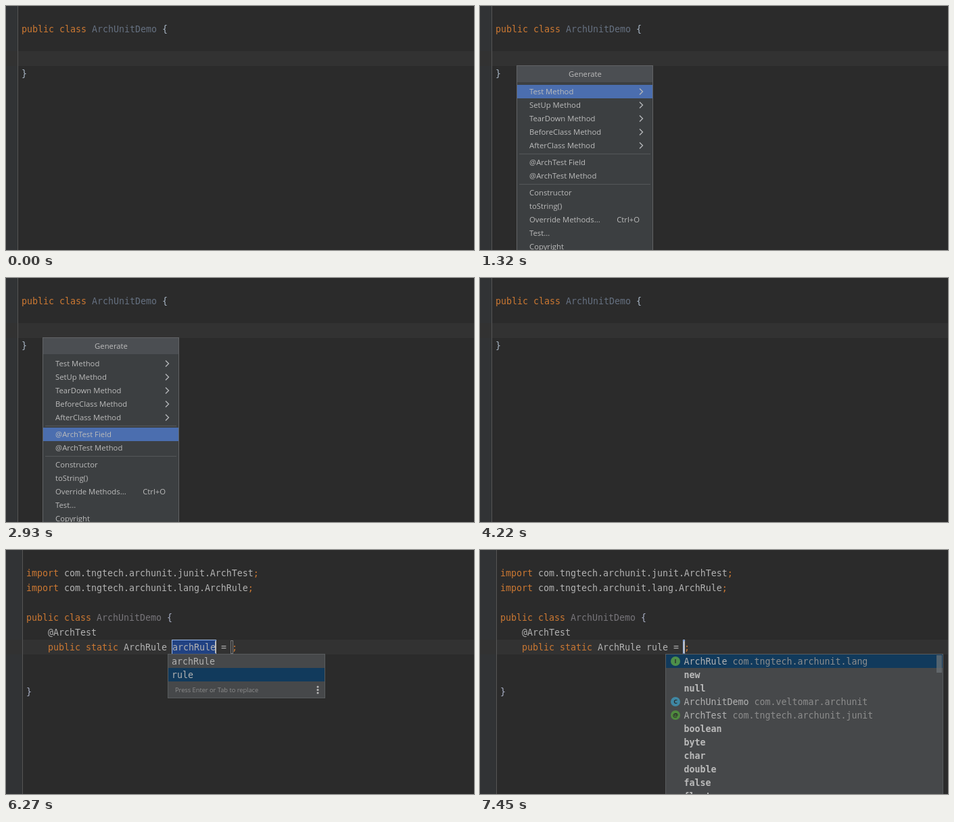
These frames come from a looping animation (692x362 px, 8 s). An HTML page:

```html
<!DOCTYPE html>
<html lang="en">
<head>
<meta charset="utf-8">
<title>Generate menu</title>
<style>
html, body { margin: 0; width: 100%; height: 100%; overflow: hidden; background: #2b2b2b; }
svg { display: block; width: 692px; height: 362px; }
text { white-space: pre; }
.code text { font: 13.29px "DejaVu Sans Mono", "Noto Sans Mono", monospace; fill: #a9b7c6; }
.code .b { font-weight: bold; fill: #bbb; }
.kw { fill: #cc7832; }
.dim { fill: #657080; }
.new text { fill: #b2b2b2; }
.new .brace { fill: #a9b0c6; }
.new .dim { fill: #77757a; }
.new .pkg { fill: #8c8c8c; }
.menu text { font: 11.3px "Open Sans", "Noto Sans", sans-serif; fill: #bbb; }
.code .hint { font: 9.25px "Open Sans", "Noto Sans", sans-serif; fill: #8c8c8c; }
.code .letter { font: bold 9px "Open Sans", "Noto Sans", sans-serif; fill: #2b2b2b; text-anchor: middle; }
.caret { fill: #bbb; }
.field { fill: #214283; stroke: #9ab9ea; }
.stop { fill: none; stroke: #7a7a7a; }
.pop { fill: #46484a; stroke: #585b5d; }
.sel { fill: #113a5c; }

.before, .after, .menu, .blink, .tail1, .tail2, .pick, .hop, .end, .list, .blink2, .rowsel, .bar {
  animation: 8s step-end infinite;
}
.before { animation-name: before; }
.after  { animation-name: after; }
.menu   { animation-name: menu; }
.bar    { animation-name: bar; }
.blink  { animation-name: blink; }
.blink2 { animation-name: blink2; }
.rowsel { animation-name: rowsel; }
.pick   { animation-name: pick; }
.tail1  { animation-name: tail1; }
.tail2  { animation-name: tail2; }
.hop    { animation-name: hop; }
.end    { animation-name: end; }
.list   { animation-name: list; }

@keyframes before { 0% { opacity: 1 } 54.375%, 100% { opacity: 0 } }
@keyframes after  { 0% { opacity: 0 } 54.375%, 100% { opacity: 1 } }
@keyframes menu   { 0% { opacity: 0 } 16.5% { opacity: 1 } 52.75%, 100% { opacity: 0 } }
@keyframes bar {
  0% { transform: translateY(0) }
  28.125% { transform: translateY(20px) }
  30.875% { transform: translateY(40px) }
  32.5% { transform: translateY(60px) }
  35% { transform: translateY(80px) }
  36.625%, 100% { transform: translateY(105px) }
}
@keyframes blink  { 0% { opacity: 0 } 4.875% { opacity: 1 } 11.5%, 100% { opacity: 0 } }
@keyframes blink2 {
  0% { opacity: 0 } 66% { opacity: 1 } 72.5% { opacity: 0 }
  78.375% { opacity: 1 } 84.875%, 100% { opacity: 0 }
}
@keyframes rowsel {
  0% { opacity: 0; transform: translateY(0) }
  66% { opacity: 1; transform: translateY(0) }
  78.375%, 100% { opacity: 1; transform: translateY(20px) }
}
@keyframes pick  { 0% { opacity: 1 } 90.75%, 100% { opacity: 0 } }
@keyframes tail1 { 0% { opacity: 1 } 91.5%, 100% { opacity: 0 } }
@keyframes tail2 { 0% { opacity: 0 } 91.5%, 100% { opacity: 1 } }
@keyframes hop   { 0% { opacity: 1 } 92.375%, 100% { opacity: 0 } }
@keyframes end   { 0% { opacity: 0 } 92.375%, 100% { opacity: 1 } }
@keyframes list  { 0% { opacity: 0 } 93.125%, 100% { opacity: 1 } }
</style>
</head>
<body>
<svg viewBox="0 0 692 362">
  <defs>
    <path id="arrow" d="M236 -4.5l4.5 4.5l-4.5 4.5" fill="none" stroke="#b4b6b8" stroke-width="1.4"/>
  </defs>
  <rect width="692" height="362" fill="#2b2b2b"/>

  <g class="before code">
    <rect width="17" height="362" fill="#313335"/>
    <rect y="67" width="692" height="22" fill="#323232"/>
    <rect x="17" width="1" height="362" fill="#555"/>
    <text x="23" y="39"><tspan class="kw">public class </tspan><tspan class="dim">ArchUnitDemo</tspan> {</text>
    <text x="23" y="105">}</text>
    <rect class="caret blink" x="54" y="69" width="2" height="18"/>
  </g>

  <g class="menu">
    <rect x="54.5" y="88.5" width="201" height="290" fill="#3c3f41" stroke="#616365"/>
    <rect x="55" y="89" width="200" height="24" fill="#4b4e52"/>
    <rect class="bar" x="55" y="117" width="200" height="20" fill="#4b6eaf"/>
    <path d="M58 219.5h194M58 264.5h194" stroke="#555759"/>
    <text x="155.5" y="105" text-anchor="middle">Generate</text>
    <text x="73" y="131">Test Method</text>
    <text x="73" y="151">SetUp Method</text>
    <text x="73" y="171">TearDown Method</text>
    <text x="73" y="191">BeforeClass Method</text>
    <text x="73" y="211">AfterClass Method</text>
    <text x="73" y="236">@ArchTest Field</text>
    <text x="73" y="256">@ArchTest Method</text>
    <text x="73" y="281">Constructor</text>
    <text x="73" y="301">toString()</text>
    <text x="73" y="321">Override Methods...</text>
    <text x="236" y="321" text-anchor="end">Ctrl+O</text>
    <text x="73" y="341">Test...</text>
    <text x="73" y="361">Copyright</text>
    <use href="#arrow" y="127"/>
    <use href="#arrow" y="147"/>
    <use href="#arrow" y="167"/>
    <use href="#arrow" y="187"/>
    <use href="#arrow" y="207"/>
  </g>

  <g class="after code new">
    <rect width="692" height="362" fill="#2b2b2b"/>
    <rect width="24" height="362" fill="#313335"/>
    <rect y="133" width="692" height="22" fill="#323232"/>
    <rect x="24" width="1" height="362" fill="#555"/>
    <text x="30" y="39"><tspan class="kw">import</tspan> com.tngtech.archunit.junit.ArchTest<tspan class="kw">;</tspan></text>
    <text x="30" y="61"><tspan class="kw">import</tspan> com.tngtech.archunit.lang.ArchRule<tspan class="kw">;</tspan></text>
    <text x="30" y="105"><tspan class="kw">public class </tspan><tspan class="dim">ArchUnitDemo</tspan><tspan class="brace"> {</tspan></text>
    <text x="62" y="127">@ArchTest</text>
    <text x="62" y="149"><tspan class="kw">public static</tspan> ArchRule</text>
    <text class="brace" x="30" y="215">}</text>

    <g class="tail1">
      <rect class="field" x="245.5" y="133.5" width="65" height="21"/>
      <rect class="stop" x="332.5" y="134.5" width="3" height="19"/>
      <text x="246" y="149">archRule = <tspan class="kw">;</tspan></text>
      <rect class="caret blink2" x="309" y="135" width="2" height="18"/>
    </g>

    <g class="pick">
      <rect class="pop" x="239.5" y="154.5" width="232" height="65"/>
      <rect class="sel rowsel" x="240" y="155" width="231" height="20"/>
      <text x="245" y="170">archRule</text>
      <text x="245" y="190">rule</text>
      <text class="hint" x="250" y="211">Press Enter or Tab to replace</text>
      <g fill="#bbb">
        <circle cx="461" cy="203" r="1.5"/>
        <circle cx="461" cy="207.5" r="1.5"/>
        <circle cx="461" cy="212" r="1.5"/>
      </g>
    </g>

    <g class="tail2">
      <g class="hop">
        <rect class="field" x="245.5" y="133.5" width="33" height="21"/>
        <rect class="stop" x="300.5" y="134.5" width="3" height="19"/>
      </g>
      <text x="246" y="149">rule = <tspan class="kw">;</tspan></text>
      <g class="end">
        <rect class="field" x="300.5" y="133.5" width="2" height="21"/>
        <rect class="caret" x="301" y="135" width="2" height="18"/>
      </g>
    </g>

    <g class="list">
      <rect class="pop" x="274.5" y="154.5" width="410" height="220"/>
      <rect class="sel" x="275" y="155" width="409" height="20"/>
      <rect x="675" y="156" width="8" height="26" fill="#6a7075" opacity=".75"/>
      <circle cx="289" cy="165" r="7" fill="#4d8f4a"/>
      <circle cx="289" cy="225" r="7" fill="#3f87a3"/>
      <circle cx="289" cy="245" r="7" fill="#4f8a3e"/>
      <text class="letter" x="289" y="168.3">I</text>
      <text class="letter" x="289" y="228.3">C</text>
      <text class="letter" x="289" y="247.8">@</text>
      <text x="301.5" y="170">ArchRule <tspan class="pkg">com.tngtech.archunit.lang</tspan></text>
      <text class="b" x="301.5" y="190">new</text>
      <text class="b" x="301.5" y="210">null</text>
      <text x="301.5" y="230">ArchUnitDemo <tspan class="pkg">com.veltomar.archunit</tspan></text>
      <text x="301.5" y="250">ArchTest <tspan class="pkg">com.tngtech.archunit.junit</tspan></text>
      <text class="b" x="301.5" y="270">boolean</text>
      <text class="b" x="301.5" y="290">byte</text>
      <text class="b" x="301.5" y="310">char</text>
      <text class="b" x="301.5" y="330">double</text>
      <text class="b" x="301.5" y="350">false</text>
      <text class="b" x="301.5" y="370">float</text>
    </g>
  </g>
</svg>
</body>
</html>
```
